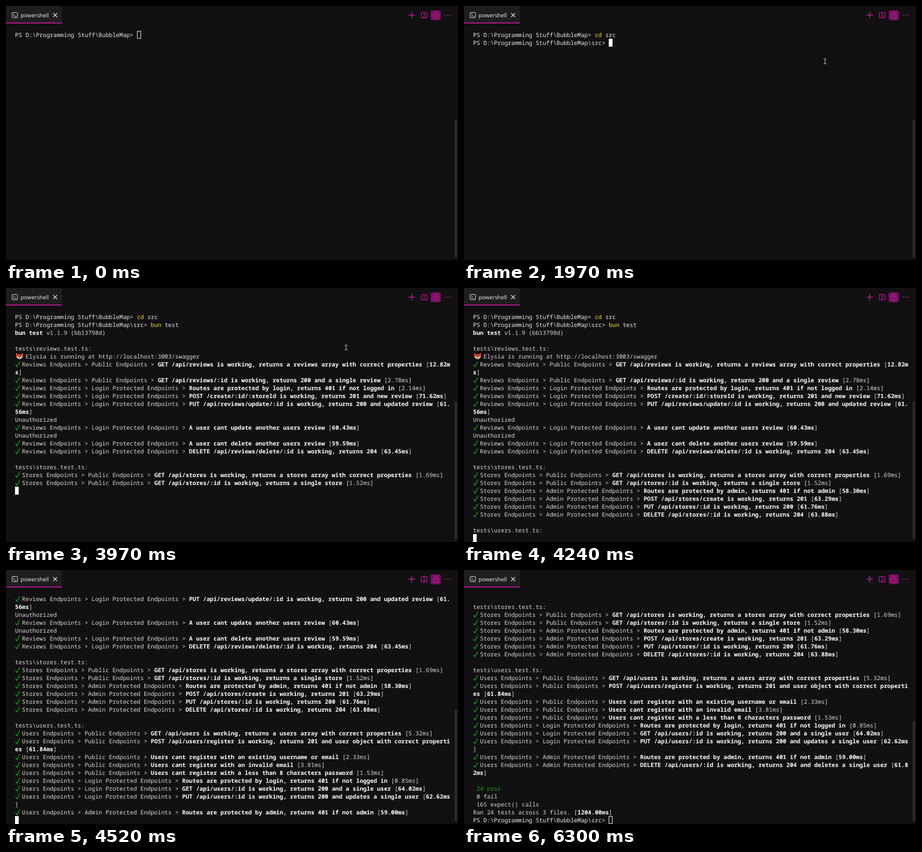
These frames come from a looping animation (800 by 450 pixels, 6360 ms). An HTML page with a canvas:

```html
<!DOCTYPE html>
<html lang="en">
<head>
<meta charset="utf-8">
<title>Terminal test run</title>
<style>
  html, body { margin: 0; width: 100%; height: 100%; overflow: hidden; background: #121012; }
  canvas { display: block; }
</style>
</head>
<body>
<canvas id="stage" width="800" height="450"></canvas>
<script>
const ctx = document.getElementById('stage').getContext('2d');
const LOOP = 6360;
const SIZE = 10.27, CELL = SIZE * 0.6, ROW = 14, LEFT = 16, TOP = 44;
const COLS = 125, ROWS = 29;
const PINK = '#c0189a', GREEN = '#16a512';

const STYLES = {
  text:   [400, '#dddcda'],
  prompt: [500, '#eceae4'],
  bold:   [700, '#ffffff'],
  cmd:    [500, '#f5e427'],
  pass:   [500, GREEN]
};

// Terminal output: each entry appears at time t
const log = [];
const add = (t, ...runs) => log.push({ t, runs });
const say = (t, text = '', style = 'text') => add(t, [text, style]);

function shell(t, path, cmd = '', keys = [], enter = Infinity) {
  log.push({ t, path, cmd, keys, enter });
}

function test(t, group, scope, name, ms) {
  log.push({ t, tick: true, runs: [
    [`  ${group} Endpoints > ${scope} Endpoints > `, 'text'],
    [name, 'bold'], [' [', 'text'],
    [ms + 'ms', ms > 10 ? 'bold' : 'text'], [']', 'text']
  ] });
}

const ROOT = 'D:\\Programming Stuff\\BubbleMap';
const LOGIN = 'Login Protected', ADMIN = 'Admin Protected', OPEN = 'Public';

shell(0, ROOT, 'cd src', [1090, 1210, 1330, 1450, 1640, 1730], 1850);
shell(1940, ROOT + '\\src', 'bun test', [2390, 2480, 2600, 2690, 2850, 2970, 3090, 3180], 3270);
add(3330, ['bun test', 'bold'], [' v1.1.9 (bb13798d)', 'text']);
say(3390);
say(3390, 'tests\\reviews.test.ts:');
log.push({ t: 3610, fox: true, runs: [['   Elysia is running at http://localhost:3003/swagger', 'text']] });
test(3640, 'Reviews', OPEN, 'GET /api/reviews is working, returns a reviews array with correct properties', '12.82');
test(3640, 'Reviews', OPEN, 'GET /api/reviews/:id is working, returns 200 and a single review', '2.78');
test(3640, 'Reviews', LOGIN, 'Routes are protected by login, returns 401 if not logged in', '2.14');
test(3700, 'Reviews', LOGIN, 'POST /create/:id/:storeId is working, returns 201 and new review', '71.62');
test(3760, 'Reviews', LOGIN, 'PUT /api/reviews/update/:id is working, returns 200 and updated review', '61.56');
say(3820, 'Unauthorized');
test(3820, 'Reviews', LOGIN, 'A user cant update another users review', '60.43');
say(3880, 'Unauthorized');
test(3880, 'Reviews', LOGIN, 'A user cant delete another users review', '59.59');
test(3940, 'Reviews', LOGIN, 'DELETE /api/reviews/delete/:id is working, returns 204', '63.45');
say(3970);
say(3970, 'tests\\stores.test.ts:');
test(3970, 'Stores', OPEN, 'GET /api/stores is working, returns a stores array with correct properties', '1.69');
test(3970, 'Stores', OPEN, 'GET /api/stores/:id is working, returns a single store', '1.52');
test(4030, 'Stores', ADMIN, 'Routes are protected by admin, returns 401 if not admin', '58.30');
test(4090, 'Stores', ADMIN, 'POST /api/stores/create is working, returns 201', '63.29');
test(4150, 'Stores', ADMIN, 'PUT /api/stores/:id is working, returns 200', '61.76');
test(4210, 'Stores', ADMIN, 'DELETE /api/stores/:id is working, returns 204', '63.88');
say(4240);
say(4240, 'tests\\users.test.ts:');
test(4270, 'Users', OPEN, 'GET /api/users is working, returns a users array with correct properties', '5.32');
test(4330, 'Users', OPEN, 'POST /api/users/register is working, returns 201 and user object with correct properties', '61.84');
test(4330, 'Users', OPEN, 'Users cant register with an existing username or email', '2.33');
test(4330, 'Users', OPEN, 'Users cant register with an invalid email', '3.81');
test(4330, 'Users', OPEN, 'Users cant register with a less than 8 characters password', '1.53');
test(4330, 'Users', LOGIN, 'Routes are protected by login, returns 401 if not logged in', '0.85');
test(4390, 'Users', LOGIN, 'GET /api/users/:id is working, returns 200 and a single user', '64.02');
test(4450, 'Users', LOGIN, 'PUT /api/users/:id is working, returns 200 and updates a single user', '62.62');
test(4510, 'Users', ADMIN, 'Routes are protected by admin, returns 401 if not admin', '59.00');
test(4570, 'Users', ADMIN, 'DELETE /api/users/:id is working, returns 204 and deletes a single user', '61.82');
say(4600);
say(4600, ' 24 pass', 'pass');
say(4600, ' 0 fail');
say(4600, ' 165 expect() calls');
add(4600, ['Ran 24 tests across 3 files. [', 'text'], ['1204.00ms', 'bold'], [']', 'text']);
shell(4640, ROOT + '\\src');

function promptRuns(entry, now) {
  const typed = entry.cmd.slice(0, entry.keys.filter(k => k <= now).length);
  const word = entry.cmd.split(' ')[0].length;
  return [
    [`PS ${entry.path}> `, 'prompt'],
    [typed.slice(0, word), 'cmd'],
    [typed.slice(word), 'prompt']
  ];
}

// Lay the visible entries out as wrapped rows, plus the caret cell
function layout(now) {
  const rows = [];
  let caret;
  for (const entry of log) {
    if (entry.t > now) break;
    let row = { tick: entry.tick, fox: entry.fox, runs: [] }, col = 0;
    rows.push(row);
    for (let [text, style] of entry.path ? promptRuns(entry, now) : entry.runs) {
      while (text) {
        if (col === COLS) {
          rows.push(row = { runs: [] });
          col = 0;
        }
        const part = text.slice(0, COLS - col);
        row.runs.push([col, part, style]);
        col += part.length;
        text = text.slice(part.length);
      }
    }
    caret = entry.path && now < entry.enter
      ? { row: rows.length - 1, col }
      : { row: rows.length, col: 0 };
  }
  return { rows, caret };
}

function rect(x, y, w, h, color) {
  ctx.fillStyle = color;
  ctx.fillRect(x, y, w, h);
}

function poly(color, ...pts) {
  ctx.fillStyle = color;
  ctx.beginPath();
  pts.forEach(([x, y]) => ctx.lineTo(x, y));
  ctx.fill();
}

function line(color, width, ...pts) {
  ctx.strokeStyle = color;
  ctx.lineWidth = width;
  ctx.beginPath();
  pts.forEach(([x, y], i) => i ? ctx.lineTo(x, y) : ctx.moveTo(x, y));
  ctx.stroke();
}

function box(x, y, w, h, r, color, width) {
  ctx.beginPath();
  ctx.roundRect(x, y, w, h, r);
  if (width) {
    ctx.strokeStyle = color;
    ctx.lineWidth = width;
    ctx.stroke();
  } else {
    ctx.fillStyle = color;
    ctx.fill();
  }
}

function drawHeader() {
  rect(0, 0, 99, 31, '#1f1d20');
  rect(0, 29.3, 99, 1.7, PINK);
  box(10.8, 11.5, 9.6, 9.2, 1, '#d8d8d8', 1);
  line('#d8d8d8', 1, [12.8, 13.6], [15.2, 16], [12.8, 18.4]);
  line('#d8d8d8', 1, [15.6, 18.5], [18.4, 18.5]);
  ctx.font = '400 9.8px "Open Sans", "Noto Sans", sans-serif';
  ctx.fillStyle = '#f2f2f2';
  ctx.fillText('powershell', 25.8, 19.8);
  line('#f0f0f0', 1.2, [83.5, 12.7], [90.5, 19.7]);
  line('#f0f0f0', 1.2, [90.5, 12.7], [83.5, 19.7]);

  line(PINK, 1.5, [712.3, 16.2], [723.7, 16.2]);
  line(PINK, 1.5, [718, 10.5], [718, 21.9]);
  box(735, 11.5, 10, 9.4, 1, PINK, 1.2);
  line(PINK, 1.2, [740, 11.5], [740, 21]);
  box(751.5, 7.8, 18, 17.4, 3.5, '#75125f');
  box(756.2, 15, 8.6, 6.4, 0.8, PINK, 1.1);
  ctx.beginPath();
  ctx.arc(760.5, 13.2, 2.5, Math.PI, 0);
  ctx.lineTo(763, 15);
  ctx.moveTo(758, 13.2);
  ctx.lineTo(758, 15);
  ctx.stroke();
  rect(760, 17.4, 1.1, 1.6, PINK);
  for (const x of [777.3, 781.5, 785.7]) box(x - 1, 15.3, 2, 2, 1, PINK);
}

function drawFox(y) {
  poly('#d8512f', [18, y + 1], [21.5, y + 3.5], [26.5, y + 3.5], [30, y + 1],
    [30, y + 8], [24, y + 13], [18, y + 8]);
  poly('#f1e8e4', [18, y + 8], [21.5, y + 7.5], [24, y + 10.5], [26.5, y + 7.5],
    [30, y + 8], [24, y + 13]);
  rect(21, y + 6.4, 1.2, 1.4, '#2b1a18');
  rect(25.8, y + 6.4, 1.2, 1.4, '#2b1a18');
  box(23, y + 10.6, 2, 1.8, 0.9, '#2b1a18');
}

function drawRow(row, y) {
  if (row.tick) line(GREEN, 1.3, [16.8, y + 8.2], [19.2, y + 11.5], [24.4, y + 2.2]);
  if (row.fox) drawFox(y);
  for (const [col, text, style] of row.runs) {
    const [weight, color] = STYLES[style];
    ctx.font = `${weight} ${SIZE}px "Noto Sans Mono", "DejaVu Sans Mono", monospace`;
    ctx.fillStyle = color;
    ctx.fillText(text, LEFT + col * CELL, y + 11);
  }
}

function drawCaret(caret, scroll, focused) {
  const x = LEFT + caret.col * CELL, y = TOP + (caret.row - scroll) * ROW;
  if (focused) rect(x, y, 6.5, ROW, '#ffffff');
  else box(Math.round(x) + 0.5, y + 0.5, 6, ROW - 1, 0, '#e8e8e8', 1);
}

const mix = (a, b, k) => a + (b - a) * k;
const part = (t, from, to) => Math.min(1, Math.max(0, (t - from) / (to - from)));

function drawPointer(t) {
  if (t < 610 || t >= 4210) return;
  const enter = 1 - (1 - part(t, 610, 790)) ** 2;
  const drift = part(t, 3850, 3970), leave = part(t, 3970, 4210) ** 2;
  const x = mix(mix(615, 639, enter), 602, drift) - 40 * leave;
  const y = mix(mix(84, 98, enter), 105.5, drift) + 350 * leave;
  const c = '#c9c9c9';
  line(c, 1, [x, y - 4], [x, y + 4]);
  line(c, 1, [x - 2.5, y - 4.2], [x + 2.5, y - 4.2]);
  line(c, 1, [x - 2.5, y + 4.2], [x + 2.5, y + 4.2]);
}

function draw(t) {
  rect(0, 0, 800, 450, '#121012');
  const { rows, caret } = layout(t);
  const scroll = Math.max(0, caret.row - ROWS + 1);
  drawHeader();
  rows.slice(scroll).forEach((row, i) => drawRow(row, TOP + i * ROW));
  drawCaret(caret, scroll, t >= 850 && t < 6300);

  const thumb = 403 * ROWS / (48 + scroll);
  rect(794, 445 - thumb, 4.5, thumb, '#2c2a2d');
  rect(795, 47, 2, 1, '#2c2a2d');
  drawPointer(t);
}

ctx.textRendering = 'geometricPrecision';
const start = performance.now();
function tick() {
  draw((performance.now() - start) % LOOP);
  requestAnimationFrame(tick);
}
tick();
</script>
</body>
</html>
```
